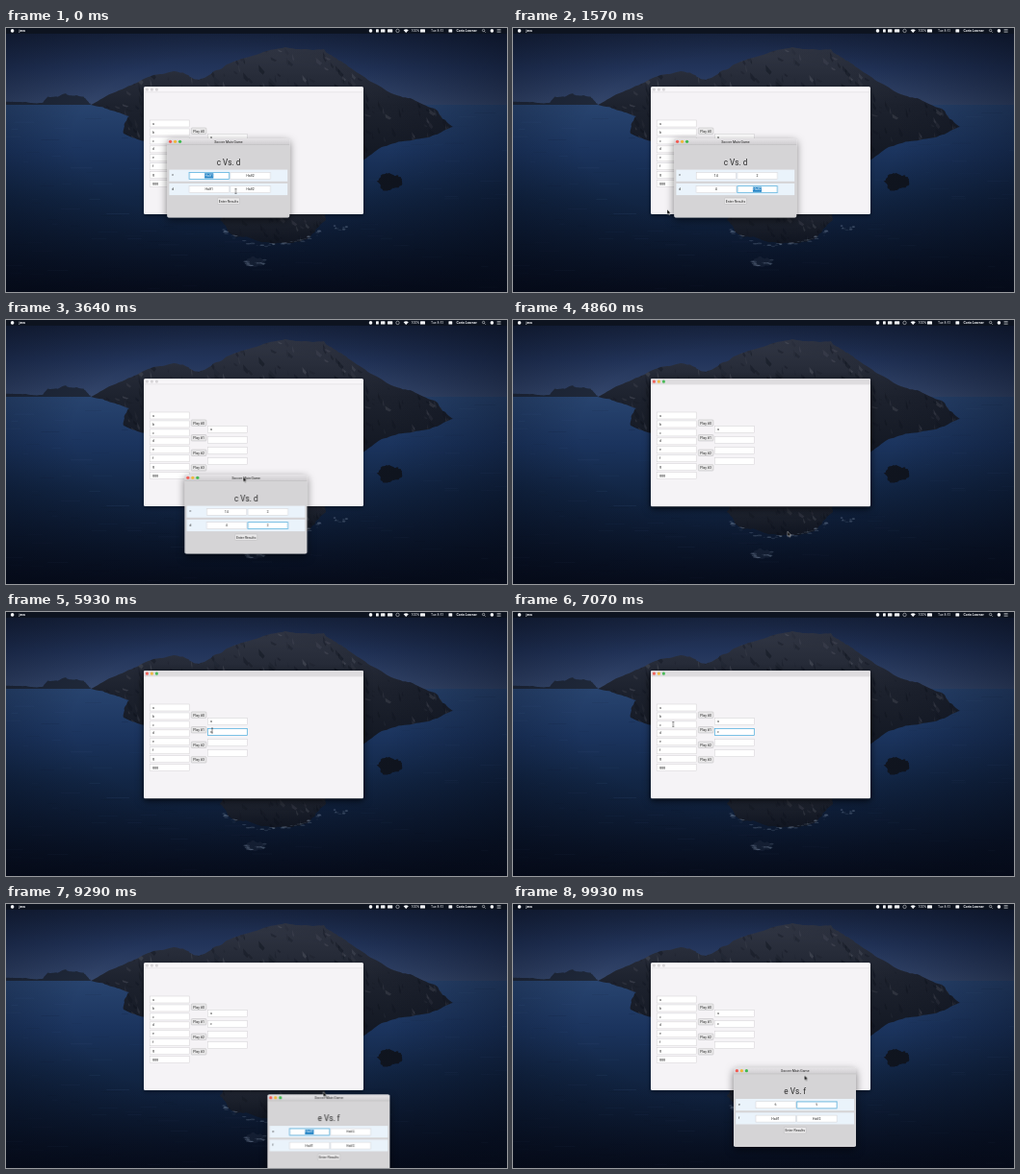
An HTML page for the animation above (10 s loop, 520 by 275 pixels).

```html
<!DOCTYPE html>
<html lang="en">
<head>
<meta charset="utf-8">
<title>Tournament bracket</title>
<style>
html, body { margin: 0; width: 100%; height: 100%; overflow: hidden; background: #0c1730; }
svg { display: block; width: 520px; height: 275px; }
text { font: 3.5px Roboto, "Liberation Sans", sans-serif; fill: #222; }
.mid { text-anchor: middle; }
.head { font-size: 8.2px; fill: #2b2b2b; }
.bold { font-weight: 700; }
.bar text { fill: #f2f4f7; }
.box { fill: #fff; stroke: #d2d0d3; stroke-width: .5; }
.btn { fill: #e9e8e9; stroke: #b9b8ba; stroke-width: .5; }
.ring { fill: none; stroke: #4db2e4; stroke-width: .7; }
</style>
</head>
<body>
<svg id="stage" viewBox="0 0 520 275"></svg>
<script>
const LOOP = 10000;
const rules = [];

// Registers a keyframe rule and returns its class name.
function anim(frames, ease = 'linear') {
  const name = 'k' + rules.length;
  const all = [...frames, [LOOP, frames[frames.length - 1][1]]];
  const body = all.map(([ms, css]) => `${ms * 100 / LOOP}%{${css}}`).join('');
  rules.push(`@keyframes ${name}{${body}}.${name}{animation:${name} ${LOOP}ms ${ease} infinite}`);
  return name;
}
// Edges alternate: appear, vanish, appear, ...
const show = (...edges) => anim(
  [[0, 'opacity:0'], ...edges.map((ms, i) => [ms, `opacity:${1 - i % 2}`])], 'step-end');
const fade = frames => anim(frames.map(([ms, a]) => [ms, `opacity:${a}`]));
// Each move is [start, end, x, y]; the element rests in between.
function path(x, y, ...moves) {
  const at = (ms, px, py) => [ms, `transform:translate(${px}px,${py}px)`];
  const frames = [at(0, x, y)];
  for (const [start, end, nx, ny] of moves) {
    frames.push(at(start, x, y), at(end, nx, ny));
    [x, y] = [nx, ny];
  }
  return anim(frames, 'ease-in-out');
}

let seed = 11;
const rnd = (a = 0, b = 1) => {
  seed = (seed * 16807) % 2147483647;
  return a + (b - a) * seed / 2147483647;
};
const repeat = (n, f) => Array.from({ length: n }, (_, i) => f(i)).join('');
const rect = (x, y, w, h, attrs) => `<rect x="${x}" y="${y}" width="${w}" height="${h}" ${attrs}/>`;
const dot = (x, y, r, fill) => `<circle cx="${x}" cy="${y}" r="${r}" fill="${fill}"/>`;
const label = (x, y, s, cls = '', attrs = '') => `<text x="${x}" y="${y}" class="${cls}" ${attrs}>${s}</text>`;
const group = (cls, inner) => `<g class="${cls}">${inner}</g>`;
const COLORS = ['#f25a52', '#f0b73a', '#3fb950'];
const GREYS = Array(3).fill('#d8d6d9');

const stop = (offset, color, a = 1) => `<stop offset="${offset}" stop-color="${color}" stop-opacity="${a}"/>`;
const gradient = (id, ...colors) =>
  `<linearGradient id="${id}" x2="0" y2="1">${colors.map((c, i) => stop(i / (colors.length - 1), c)).join('')}</linearGradient>`;
const shadow = (id, dy, blur, a) =>
  `<filter id="${id}" x="-20%" y="-20%" width="140%" height="150%"><feDropShadow dx="0" dy="${dy}" stdDeviation="${blur}" flood-opacity="${a}"/></filter>`;

// Midpoint displacement turns a few key points into a craggy outline.
function rough(pts, amp, depth = 4) {
  if (!depth) return pts;
  const finer = pts.flatMap(([x, y], i) => {
    const [u, v] = pts[(i + 1) % pts.length];
    return [[x, y], [(x + u) / 2 + rnd(-amp, amp), (y + v) / 2 + rnd(-amp, amp)]];
  });
  return rough(finer, amp / 2, depth - 1);
}
const blob = (x, y, rx, ry, amp) => rough(Array.from({ length: 8 }, (_, i) =>
  [x + rx * Math.cos(i * Math.PI / 4), y + ry * Math.sin(i * Math.PI / 4)]), amp);
const poly = (pts, fill) => `<polygon points="${pts.map(p => p.map(v => v.toFixed(1))).join(' ')}" fill="${fill}"/>`;

const crags = (n, x0, y0, x1, y1) => repeat(n, () => {
  const w = rnd(1, 7), h = rnd(2, 8), fill = rnd() < .6 ? '#080c16' : '#646672';
  return `<path d="M${rnd(x0, x1)} ${rnd(y0, y1)}l${w} ${h}l${-w * .3} ${h * .4}l${-w * .6} ${-h * .5}z" fill="${fill}" opacity="${rnd(.08, .36)}"/>`;
});
// Surf scattered along the lower rim of an ellipse.
const foam = (n, x, y, rx, ry) => repeat(n, () => {
  const a = rnd(.3, 2.8);
  return `<ellipse cx="${x + rx * Math.cos(a)}" cy="${y + ry * Math.sin(a) + rnd(-2, 2)}" rx="${rnd(.8, 3)}" ry="${rnd(.3, 1)}" fill="#9aaec8" opacity="${rnd(.1, .4)}"/>`;
});

function wallpaper() {
  const island = rough([[88, 80], [136, 57], [174, 45], [200, 54], [229, 38], [290, 20],
    [330, 22], [355, 40], [400, 68], [445, 84], [464, 103], [438, 114], [390, 124],
    [365, 140], [150, 120], [122, 110], [128, 92]], 2.5);
  const shore = blob(277, 200, 55, 25, 4);
  const land = poly(island, 'url(#rock)') + poly(shore, 'url(#rock)');
  const ripples = repeat(180, () =>
    rect(rnd(-10, 515), rnd(84, 272), rnd(5, 24), rnd(.3, .8),
      `fill="${rnd() < .5 ? '#5d7fb0' : '#040a18'}" opacity="${rnd(.04, .15)}"`));
  return `<defs>
    ${gradient('sky', '#17233e', '#22345a', '#35476b')}
    ${gradient('sea', '#28446f', '#1b345e', '#122645', '#0d1b33', '#080f20')}
    ${gradient('rock', '#313644', '#1d222e', '#121722')}
    <radialGradient id="dusk" cx=".45" cy=".42" r=".7">${stop(.45, '#030713', 0)}${stop(1, '#030713', .55)}</radialGradient>
    <clipPath id="land">${land}</clipPath>
    </defs>` +
    rect(0, 0, 520, 82, 'fill="url(#sky)"') +
    poly(blob(62, 80, 26, 12, 2), '#1f2839') +
    poly(blob(14, 81, 36, 4, 1), '#1f2839') +
    rect(0, 80, 520, 195, 'fill="url(#sea)"') + ripples + land +
    `<g clip-path="url(#land)">${crags(420, 85, 18, 465, 125)}${crags(60, 220, 180, 335, 228)}</g>` +
    poly(blob(398, 160, 13, 9, 2), '#10151f') +
    poly(blob(258, 244, 11, 5, 2), '#18243a') +
    foam(36, 277, 200, 55, 26) + foam(18, 258, 242, 11, 4) + foam(8, 347, 206, 8, 3) +
    rect(0, 0, 520, 275, 'fill="url(#dusk)"');
}

function menuBar() {
  const white = '#f2f4f7';
  const tiles = [[384, 2.8], [389, 4.4], [396, 5.2], [430, 5], [459.4, 3.8]];
  return group('bar ' + fade([[0, 1], [7790, 1], [8210, .35], [9070, .35], [9280, 1]]),
    rect(0, 0, 520, 5.8, 'fill="#0d131f"') +
    [6.6, 378.5, 504.4].map(x => dot(x, 2.9, 1.8, white)).join('') +
    tiles.map(([x, w]) => rect(x, 1.2, w, 3.4, `rx=".6" fill="${white}"`)).join('') +
    label(13.6, 4.2, 'java', 'bold') + label(420.6, 4.2, '100%') +
    label(441, 4.2, 'Tue 8:51') + label(467.5, 4.2, 'Corin Learner', 'bold') +
    `<path d="M412.6 2.2Q415.2 .2 417.8 2.2L415.2 4.9Z" fill="${white}"/>` +
    `<g fill="none" stroke="${white}" stroke-width=".5"><circle cx="406.5" cy="2.9" r="1.7"/>` +
    `<circle cx="495.6" cy="2.5" r="1.2"/><path d="M496.5 3.4l1.3 1.3M509.6 1.5h4m-4 1.4h4m-4 1.4h4"/></g>`);
}

const titleBar = (w, h, fill, lamps) =>
  `<path d="M0 ${h}V1.6Q0 0 1.6 0H${w - 1.6}Q${w} 0 ${w} 1.6V${h}Z" fill="${fill}"/>` +
  lamps.map((c, i) => dot(3.4 + i * 5, h / 2, 1.6, c)).join('');

function bracket() {
  const left = ['a', 'b', 'c', 'd', 'e', 'f', 'g', 'ggg'].map((s, i) =>
    rect(149.2, 96 + i * 8.95, 41, 7, 'class="box"') + label(152, 100.6 + i * 8.95, s)).join('');
  const plays = repeat(4, i =>
    rect(192.3, 104 + i * 15.55, 15.6, 6.4, 'rx=".8" class="btn"') +
    label(200.1, 108.5 + i * 15.55, 'Play #' + i, 'mid'));
  const right = repeat(4, i => rect(209.3, 110.6 + i * 11, 41, 7, 'class="box"'));
  const frame = (filter, fill, lamps) =>
    rect(0, 0, 228, 132.7, `rx="1.6" fill="#f5f3f6" filter="url(#${filter})"`) +
    titleBar(228, 5.6, fill, lamps);
  return `<g transform="translate(143 61.3)">` +
    frame('soft', '#f8f6f9', GREYS) +
    group(show(4640, 7500), frame('deep', '#dedcdf', COLORS)) +
    rect(0, 5.5, 228, .4, 'fill="#cfcdd0"') + '</g>' +
    left + plays + right +
    label(212, 115.2, 'a') +
    rect(209.3, 121.6, 41, 7, `class="ring ${show(5860, 7500)}"`) +
    label(212, 126.2, 'c', show(5930, LOOP));
}

// A score box: hint, then selected hint while focused, then typed values.
function cell(x, y, hint, from = LOOP, to = LOOP, ...values) {
  const cx = x + 20.5, ty = y + 4.7;
  const typed = values.length ? values[0][0] : LOOP;
  return rect(x, y, 41.3, 7, 'class="box"') +
    label(cx, ty, hint, 'mid ' + show(0, from)) +
    group(show(from, typed),
      rect(cx - 4.6, y + .9, 9.2, 5.2, 'fill="#2384c6"') +
      label(cx, ty, hint, 'mid', 'style="fill:#fff"')) +
    values.map(([ms, s], i) =>
      label(cx, ty, s, 'mid ' + show(ms, (values[i + 1] || [LOOP])[0]))).join('') +
    rect(x, y, 41.3, 7, `class="ring ${show(from, to)}"`);
}

function dialog(names, visible, route, cells) {
  return group(visible, group(route,
    rect(0, 0, 127, 82.6, 'rx="1.8" fill="#d5d4d6" filter="url(#deep)"') +
    titleBar(127, 6.6, 'url(#title)', COLORS) +
    rect(0, 6.4, 127, .4, 'fill="#b4b2b5"') +
    label(63.8, 4.6, 'Soccer Main Game', 'mid') +
    label(63.8, 28, names.join(' Vs. '), 'mid head') +
    names.map((s, i) =>
      rect(2.2, 32.6 + i * 14.3, 122.8, 12.2, 'fill="#eaf3fb"') +
      label(5, 39.4 + i * 14.3, s)).join('') +
    repeat(4, i => cell(23 + i % 2 * 42.8, 35.4 + (i >> 1) * 14.3, 'Half' + (i % 2 + 1), ...(cells[i] || []))) +
    rect(52.3, 62, 23, 6.5, 'rx=".8" class="btn"') +
    label(63.8, 66.5, 'Enter Results', 'mid')));
}

function pointer() {
  const route = path(238.5, 170,
    [70, 500, 160, 189], [1860, 2150, 200, 244], [2150, 2570, 228, 118.8],
    [2860, 3210, 246.3, 163.5], [4140, 4360, 247, 225], [4500, 4930, 287, 220],
    [5140, 5860, 214, 123.5], [6210, 6640, 221, 132], [6790, 7070, 166.3, 117],
    [7360, 7470, 199, 139], [7510, 7640, 230, 247], [9060, 9070, 376, 226.6],
    [9070, 9500, 287, 167.6], [9640, 9930, 302.5, 178.5]);
  const beam = [0, 300, 5790, 6350, 6980, 7420];
  return group(route,
    group(show(...beam.slice(1), 7640, 9070, LOOP),
      '<path d="M0 0V5.2L1.2 4.1 2 5.9 2.9 5.5 2.1 3.8H3.7Z" stroke="#fff" stroke-width=".4"/>') +
    group(show(...beam),
      '<path d="M-.9 -2.4H.9M0 -2.4V2.4M-.9 2.4H.9" stroke="#111" stroke-width=".5"/>'));
}

const first = dialog(['c', 'd'], show(0, 4500),
  path(167.2, 115, [2860, 3210, 185.4, 161]),
  [[0, 710, [290, '1'], [430, '14']],
   [710, 1280, [1140, '2']],
   [1280, 1560, [1420, '4']],
   [1560, LOOP, [1860, '2']]]);

const second = dialog(['e', 'f'], show(9070, LOOP),
  path(318, 229.4, [9070, 9500, 229, 170.4]),
  [[9070, 9720, [9570, '6']],
   [9720, LOOP, [9860, '5']]]);

const art = `<defs>${gradient('title', '#e6e4e7', '#cfcdd0')}${shadow('deep', 3, 4.5, .5)}${shadow('soft', 1.5, 2.5, .4)}</defs>` +
  wallpaper() + menuBar() + bracket() + first +
  group(fade([[0, .58], [9140, .58], [9280, 1]]), second) + pointer();

const style = document.createElement('style');
style.textContent = rules.join('\n');
document.head.append(style);
document.getElementById('stage').innerHTML = art;
</script>
</body>
</html>
```
